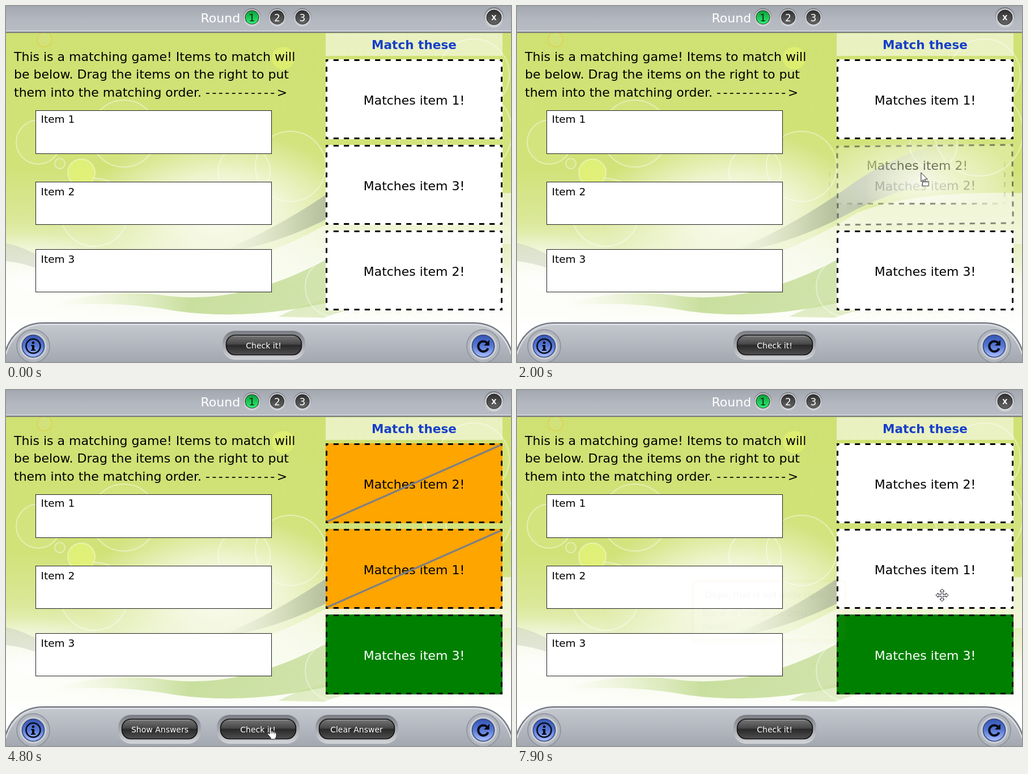
An HTML page that plays this animation: 891 by 628 pixels, repeating every 8 s.

```html
<!DOCTYPE html>
<html lang="en">
<head>
<meta charset="utf-8">
<title>Matching game</title>
<style>
html, body { margin: 0; width: 100%; height: 100%; overflow: hidden; }
svg { display: block; width: 891px; height: 628px; }
text { font-family: "DejaVu Sans", Verdana, sans-serif; white-space: pre; }
.body { font-size: 22px; }
.item { font-size: 18.5px; }
.btn text { font-size: 14px; fill: #fff; text-anchor: middle; }
.mid { text-anchor: middle; }
.popup text { font-family: "Liberation Sans", Arial, sans-serif; fill: #4a4a4a; }

/* Shared clock; the tiny negative delay keeps hard cuts on the near side of each tick. */
.a { animation: 8s step-end -5ms infinite; }
.drag { animation-name: drag; }
.rest { animation-name: rest; }
.one { animation-name: one; }
.two { animation-name: two; }
.three { animation-name: three; }
.graded { animation-name: graded; }
.correct { animation-name: correct; }
.check { animation-name: check; }
.press { animation-name: press; }
.popup { animation-name: popup; filter: drop-shadow(0 3px 5px rgba(0,0,0,.35)); }
.ghost { animation-name: ghost; }
.cursor { animation-name: cursor; }
.arrow { animation-name: arrow; }
.move { animation-name: move; }
.hand { animation-name: hand; }
.wobble { transform-origin: 156px 70.5px; animation: wobble .2s step-end -5ms infinite; }

@keyframes wobble { 0%, 100% { transform: rotate(-.6deg); } 50% { transform: rotate(.6deg); } }
@keyframes drag { 0%, 33.75%, 100% { opacity: 0; } 18.75% { opacity: 1; } }
@keyframes rest { 0%, 33.75%, 100% { opacity: 1; } 18.75% { opacity: 0; } }
@keyframes one { 0% { transform: translate(564px,94px); } 27.5%, 100% { transform: translate(564px,245px); } }
@keyframes three { 0% { transform: translate(564px,245px); } 22.5%, 100% { transform: translate(564px,396px); } }
@keyframes two {
  0% { transform: translate(564px,396px); }
  22.5% { transform: translate(564px,245px); }
  27.5%, 100% { transform: translate(564px,94px); }
}
@keyframes graded { 0%, 92.5%, 100% { opacity: 0; } 58.75% { opacity: 1; } }
@keyframes correct { 0% { opacity: 0; } 58.75%, 100% { opacity: 1; } }
@keyframes check { 0%, 92.5%, 100% { transform: none; } 58.75% { transform: translate(-10px,0); } }
@keyframes press { 0%, 92.5%, 100% { opacity: 0; } 90% { opacity: .3; } }
@keyframes popup {
  0% { opacity: 0; }
  61.25% { opacity: 0; animation-timing-function: steps(4,start); }
  66.25% { opacity: 1; }
  92.5% { opacity: 1; animation-timing-function: steps(5,end); }
  98.75%, 100% { opacity: .03; }
}
@keyframes ghost {
  0% { transform: none; }
  18.75% { transform: translate(0,0); animation-timing-function: steps(3,start); }
  22.5% { transform: translate(-14px,-99px); animation-timing-function: steps(7,start); }
  31.25%, 100% { transform: translate(-14px,-304px); }
}
@keyframes cursor {
  0% { transform: translate(650px,640px); }
  11.25% { transform: translate(650px,630px); animation-timing-function: steps(4,start); }
  16.25% { transform: translate(726px,497px); }
  18.75% { transform: translate(726px,497px); animation-timing-function: steps(3,start); }
  22.5% { transform: translate(712px,371px); animation-timing-function: steps(7,start); }
  31.25% { transform: translate(714px,191px); }
  48.75% { transform: translate(705px,208px); }
  50% { transform: translate(705px,208px); animation-timing-function: steps(6,start); }
  57.5% { transform: translate(465px,594px); }
  76.25% { transform: translate(548px,604px); }
  77.5% { transform: translate(548px,604px); animation-timing-function: steps(3,start); }
  81.25% { transform: translate(608px,598px); }
  92.5% { transform: translate(608px,598px); animation-timing-function: steps(6,start); }
  100% { transform: translate(750px,362px); }
}
@keyframes arrow {
  0%, 13.75%, 33.75%, 56.25%, 93.75%, 100% { opacity: 0; }
  11.25%, 18.75%, 53.75%, 92.5% { opacity: 1; }
}
@keyframes move {
  0%, 18.75%, 53.75% { opacity: 0; }
  13.75%, 33.75%, 93.75%, 100% { opacity: 1; }
}
@keyframes hand { 0%, 92.5%, 100% { opacity: 0; } 56.25% { opacity: 1; } }
</style>
</head>
<body>
<svg viewBox="0 0 891 628">
<defs>
  <linearGradient id="sky" x2="0" y2="1">
    <stop stop-color="#cfe172"/><stop offset=".45" stop-color="#d1e278"/>
    <stop offset=".6" stop-color="#dae898"/><stop offset=".7" stop-color="#ebf3cc"/>
    <stop offset=".8" stop-color="#f6f9e8"/><stop offset=".9" stop-color="#fff"/>
  </linearGradient>
  <radialGradient id="glow">
    <stop stop-color="#fff" stop-opacity=".95"/><stop offset=".45" stop-color="#fff" stop-opacity=".6"/><stop offset="1" stop-color="#fff" stop-opacity="0"/>
  </radialGradient>
  <linearGradient id="swoosh">
    <stop stop-color="#dfe5d0" stop-opacity="0"/><stop offset=".45" stop-color="#b9c3a0"/>
    <stop offset=".6" stop-color="#aab592"/><stop offset="1" stop-color="#c9d89a" stop-opacity="0"/>
  </linearGradient>
  <linearGradient id="wave">
    <stop stop-color="#e6f0c8" stop-opacity="0"/><stop offset=".3" stop-color="#c0da90"/>
    <stop offset=".65" stop-color="#cbe0a2"/><stop offset="1" stop-color="#e6f0cc" stop-opacity=".2"/>
  </linearGradient>
  <linearGradient id="topbar" x2="0" y2="1">
    <stop stop-color="#a3a7b0"/><stop offset=".5" stop-color="#b3b7bf"/><stop offset="1" stop-color="#b9bcc4"/>
  </linearGradient>
  <linearGradient id="lowbar" x2="0" y2="1">
    <stop stop-color="#c5c8cf"/><stop offset=".5" stop-color="#b4b8c0"/><stop offset="1" stop-color="#a2a6ae"/>
  </linearGradient>
  <linearGradient id="bezel" x2="0" y2="1"><stop stop-color="#797c83"/><stop offset="1" stop-color="#d3d5d9"/></linearGradient>
  <linearGradient id="pill" x2="0" y2="1">
    <stop stop-color="#777"/><stop offset=".45" stop-color="#484848"/><stop offset=".52" stop-color="#292929"/><stop offset="1" stop-color="#505050"/>
  </linearGradient>
  <linearGradient id="knob" x2="0" y2="1"><stop stop-color="#303030"/><stop offset="1" stop-color="#666"/></linearGradient>
  <linearGradient id="lit" x2="0" y2="1"><stop stop-color="#0a9f3b"/><stop offset="1" stop-color="#30ed70"/></linearGradient>
  <linearGradient id="blue" x2="0" y2="1"><stop stop-color="#3556b5"/><stop offset=".5" stop-color="#5878d6"/><stop offset="1" stop-color="#a9c0ff"/></linearGradient>
  <radialGradient id="fade" gradientUnits="userSpaceOnUse" r="1" cx="0" cy="0" gradientTransform="translate(726 497) scale(172 92)">
    <stop stop-color="#fff" stop-opacity=".75"/><stop offset="1" stop-color="#fff" stop-opacity="0"/>
  </radialGradient>
  <mask id="halo" maskUnits="userSpaceOnUse" x="560" y="390" width="320" height="152">
    <rect x="560" y="390" width="320" height="152" fill="url(#fade)"/>
  </mask>

  <g id="dashes" fill="none" stroke="#000" stroke-width="3" stroke-dasharray="1" stroke-dashoffset=".5">
    <path pathLength="68" d="M0 1.5H312M0 139.5H312"/>
    <path pathLength="32" d="M1.5 0V141M310.5 0V141"/>
  </g>
  <g id="card"><rect width="312" height="141" fill="#fff"/><use href="#dashes"/></g>
  <g id="wrong"><rect width="312" height="141" fill="#ffa500"/><use href="#dashes"/></g>
  <path id="strike" d="M3 138 309 3" stroke="#808080" stroke-width="3.5"/>
  <g id="button">
    <rect x="-73" y="573" width="146" height="51" rx="22" fill="url(#bezel)"/>
    <rect x="-66.5" y="580.5" width="133" height="35" rx="16" fill="url(#pill)" stroke="#111" stroke-width="1.6"/>
    <path d="M-53 582.5H53" stroke="#aaa" opacity=".7"/>
  </g>
  <g id="ring">
    <circle r="16" fill="url(#bezel)"/><circle r="14.3" fill="#d2d4d8"/><circle r="12.5" fill="#292929"/>
  </g>
  <g id="round">
    <circle r="29" fill="#b1b5bd" stroke="#8b8f97" stroke-width="1.5"/>
    <circle r="23" fill="#c5c8ce" stroke="#d9dbe0"/>
    <circle r="19.5" fill="url(#blue)" stroke="#30437d" stroke-width="1.5"/>
  </g>
</defs>

<rect width="891" height="628" fill="url(#sky)"/>
<ellipse cx="380" cy="355" rx="235" ry="135" fill="url(#glow)"/>
<ellipse cx="40" cy="490" rx="190" ry="90" fill="url(#glow)"/>
<path d="M0 418Q70 434 130 500Q60 456 0 450Z" fill="#c9cfbd" opacity=".5"/>
<path d="M370 436Q480 395 600 308Q680 255 780 235V300Q680 320 600 358Q480 425 370 436Z" fill="url(#swoosh)"/>
<path d="M340 470Q480 440 600 365Q700 325 891 330V420Q640 420 480 500Z" fill="#fff" opacity=".55"/>
<path d="M80 530Q170 495 290 512Q420 525 560 450Q660 405 891 405V450Q720 480 560 525Q420 555 300 538Q190 518 80 530Z" fill="url(#wave)" opacity=".85"/>
<path d="M480 548Q620 480 790 520Q650 515 560 550Z" fill="#c5de94" opacity=".5"/>
<ellipse cx="840" cy="515" rx="130" ry="60" fill="url(#glow)"/>
<g fill="#fff" fill-opacity=".05" stroke="#fff" stroke-opacity=".42" stroke-width="2">
  <circle cx="57" cy="240" r="39"/><circle cx="208" cy="225" r="59"/><circle cx="95" cy="278" r="9"/>
  <circle cx="156" cy="364" r="60"/><circle cx="420" cy="292" r="46"/><circle cx="502" cy="283" r="62"/>
  <circle cx="825" cy="121" r="63"/><circle cx="815" cy="222" r="78"/><circle cx="735" cy="245" r="42"/>
  <circle cx="580" cy="496" r="52"/>
  <circle cx="133" cy="294" r="24" fill="#e2f278" fill-opacity=".9"/>
  <circle cx="68" cy="59" r="13" stroke="#dfcf4c" stroke-opacity=".7"/>
  <circle cx="489" cy="92" r="20" fill="#e0f070" fill-opacity=".8" stroke="none"/>
</g>

<rect width="891" height="46" fill="url(#topbar)"/>
<path d="M0 44H891" stroke="#cfd1d6" stroke-width="2"/>
<path d="M0 46.5H891" stroke="#6e727b" stroke-width="2"/>
<text class="body" x="343.5" y="29" fill="#fff">Round</text>
<g class="mid" font-size="17" fill="#fff">
  <use href="#ring" x="434" y="20"/><circle cx="434" cy="20" r="11.5" fill="url(#lit)"/>
  <use href="#ring" x="478.5" y="20"/><circle cx="478.5" cy="20" r="11.5" fill="url(#knob)"/>
  <use href="#ring" x="523" y="20"/><circle cx="523" cy="20" r="11.5" fill="url(#knob)"/>
  <text x="434" y="27" fill="#0b2513">1</text><text x="478.5" y="27">2</text><text x="523" y="27">3</text>
  <circle cx="861" cy="20" r="18" fill="url(#bezel)"/><circle cx="861" cy="20" r="15.5" fill="#d2d4d8"/>
  <circle cx="861" cy="20" r="13" fill="url(#knob)" stroke="#222"/>
  <text x="861" y="24.5" font-size="12" font-weight="bold">X</text>
</g>

<g class="body">
  <text x="14" y="97">This is a matching game! Items to match will</text>
  <text x="14" y="128">be below. Drag the items on the right to put</text>
  <text x="14" y="160">them into the matching order. <tspan letter-spacing="3.5">-----------</tspan>&gt;</text>
</g>
<g fill="#fff" stroke="#222">
  <rect x="52.5" y="184.5" width="416" height="76"/>
  <rect x="52.5" y="310.5" width="416" height="75"/>
  <rect x="52.5" y="429.5" width="416" height="75"/>
</g>
<text class="item" x="61.5" y="206">Item 1</text>
<text class="item" x="61.5" y="334">Item 2</text>
<text class="item" x="61.5" y="453">Item 3</text>

<rect x="564" y="48" width="312" height="40" fill="#fff" opacity=".55"/>
<text class="mid" x="720" y="76" font-size="21.6" font-weight="bold" fill="#173fca">Match these</text>

<g class="body mid">
  <g class="a one"><use href="#card"/><text x="156" y="80">Matches item 1!</text></g>
  <g class="a three"><use href="#card"/><text x="156" y="80">Matches item 3!</text></g>
  <g class="a two">
    <g class="a rest"><use href="#card"/><text x="156" y="80">Matches item 2!</text></g>
    <g class="a drag"><g class="wobble">
      <rect width="312" height="141" fill="#fff" opacity=".22"/>
      <g opacity=".45"><use href="#dashes"/><text x="156" y="80">Matches item 2!</text></g>
    </g></g>
  </g>
  <g class="a graded">
    <g transform="translate(564 94)"><use href="#wrong"/><text x="156" y="80">Matches item 2!</text><use href="#strike"/></g>
    <g transform="translate(564 245)"><use href="#wrong"/><text x="156" y="80">Matches item 1!</text><use href="#strike"/></g>
  </g>
  <g class="a correct"><g transform="translate(564 396)">
    <rect width="312" height="141" fill="#008000"/><use href="#dashes"/>
    <text x="156" y="80" fill="#fff">Matches item 3!</text>
  </g></g>
  <g class="a drag"><g class="a ghost"><g mask="url(#halo)">
    <use href="#card" x="564" y="396"/><text x="720" y="476">Matches item 2!</text>
  </g></g></g>
</g>

<path d="M-2 612C8 578 32 559 66 559H825C859 559 883 578 893 612V630H-2Z" fill="url(#lowbar)" stroke="#6d717b" stroke-width="2"/>
<path d="M0 614C10 581 34 562 66 562H825C857 562 881 581 891 614" fill="none" stroke="#dcdee2" stroke-width="2"/>
<use href="#round" x="48" y="600"/>
<g transform="translate(48 600)">
  <circle r="12.5" fill="none" stroke="#080c18" stroke-width="2.6"/>
  <circle cy="-6" r="2.3"/><path d="M-3.5-2H2V6H4V8H-4V6H-2V0H-3.5Z"/>
</g>
<use href="#round" x="842" y="600"/>
<g transform="translate(842 600)">
  <path d="M6.5-6A9 9 0 1 0 8.5 4" fill="none" stroke="#080c18" stroke-width="4"/>
  <path d="M11-11V-1H1Z" fill="#080c18"/>
</g>

<g class="btn">
  <g class="a check"><use href="#button" x="455"/><text x="454.5" y="604">Check it!</text></g>
  <g class="a graded">
    <use href="#button" x="271"/><text x="271.5" y="604">Show Answers</text>
    <use href="#button" x="619"/><text x="618.5" y="604">Clear Answer</text>
    <rect class="a press" x="552.5" y="580.5" width="133" height="35" rx="16"/>
  </g>
</g>

<g class="a popup">
  <rect x="310" y="337" width="269" height="104" rx="4" fill="#fff" stroke="#ffa500" stroke-width="4"/>
  <text x="331.5" y="367" font-size="16.1" font-weight="bold">Oops, that is not quite right.</text>
  <text x="326.5" y="399" font-size="16.8">Some of your items don't</text>
  <text x="326.5" y="423" font-size="16.8">match.</text>
  <text x="558" y="355" font-size="15">x</text>
</g>

<g class="a cursor" fill="#fff" stroke="#1c1c24" stroke-linejoin="round">
  <g class="a arrow">
    <path d="M0 0V16L3.7 12.6 6.2 18.4 8.6 17.4 6.2 11.8H11.4Z"/>
    <g class="a drag"><path d="M2.5 15.5H13.5V23.5H2.5Z"/><path d="M4 17.5H12" stroke-dasharray="1.5"/></g>
  </g>
  <path class="a move" d="M0-11 4-7H1.5V-1.5H7V-4L11 0 7 4V1.5H1.5V7H4L0 11-4 7H-1.5V1.5H-7V4L-11 0-7-4V-1.5H-1.5V-7H-4Z"/>
  <g class="a hand">
    <path d="M0 1.5Q1.5-1 3 1.5V8Q5.5 6.8 6 9Q8.5 7.8 9 10Q12 9 12 12V17L10 22H2.5L1.5 19-3.5 13Q-4.5 10.5-2 11L0 13Z"/>
    <path d="M3 8V12M6 9V12M9 10V13" fill="none"/>
  </g>
</g>
</svg>
</body>
</html>
```
